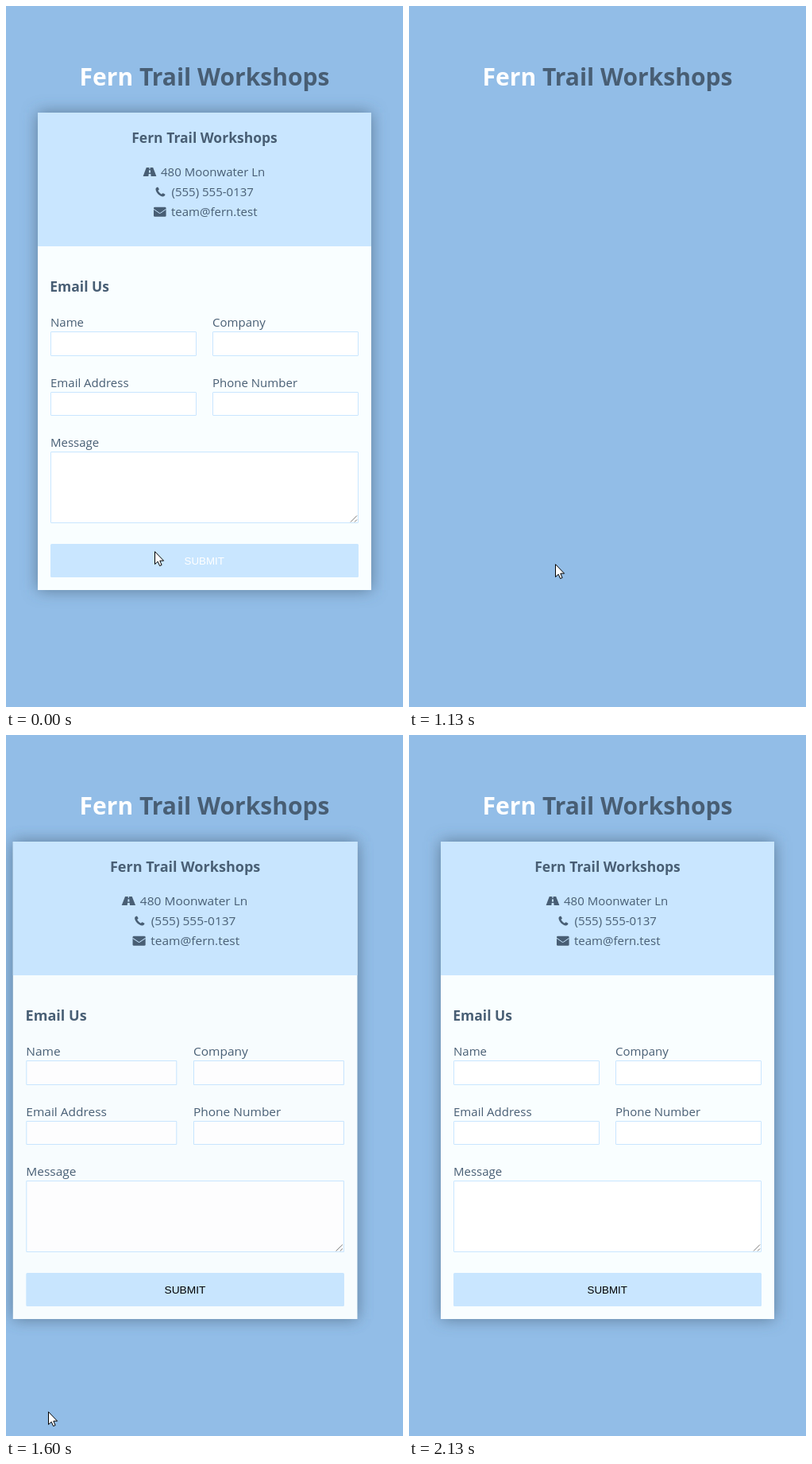
Write an HTML page that moves like this. It is 500 px wide and 881 px high and loops after 2540 ms.

```html
<!DOCTYPE html>
<html lang="en">
<head>
<meta charset="utf-8">
<title>Contact form</title>
<style>
  html, body { margin: 0; width: 100%; height: 100%; overflow: hidden; background: #92bde7; }
  svg { display: block; width: 100%; height: 100%; }
  text { font: 15px "Open Sans", "Noto Sans", sans-serif; fill: #485e74; white-space: pre; }
  .title { font-size: 30px; font-weight: 700; }
  .head { font-size: 17.5px; font-weight: 700; }
  .mid { text-anchor: middle; }
  .label { font: 13.33px "Liberation Sans", Arial, sans-serif; }
  .field { fill: #fff; stroke: #c9e6ff; }
  .icon { fill: #485e74; }
</style>
</head>
<body>
<svg viewBox="0 0 500 881">
  <defs>
    <filter id="blur" filterUnits="userSpaceOnUse" x="0" y="94" width="500" height="680">
      <feGaussianBlur stdDeviation="10"/>
    </filter>
  </defs>
  <rect width="500" height="881" fill="#92bde7"/>
  <text class="title mid" x="250" y="100"><tspan fill="#fff">Fern</tspan> Trail Workshops</text>

  <g id="card">
    <rect x="40" y="134" width="420" height="600" fill="#485e74" fill-opacity=".7" filter="url(#blur)"/>
    <rect x="40" y="134" width="420" height="600" fill="#f9feff"/>
    <rect x="40" y="134" width="420" height="168" fill="#c9e6ff"/>
    <text class="head mid" x="250" y="172">Fern Trail Workshops</text>

    <path class="icon" d="M176.8 203H185.2L189.4 214H172.6Z"/>
    <path fill="#c9e6ff" d="M180.4 203h1.2l.1 1.8h-1.4zM180.2 206.2h1.6l.3 3.2h-2.2zM179.7 211h2.6l.3 3h-3.2z"/>
    <text x="195" y="214">480 Moonwater Ln</text>

    <path class="icon" transform="translate(188.5 227.5)" d="M2.5 0C1 .4 0 1.3 0 3C.3 7 5 11.7 9 12C10.7 12 11.6 11 12 9.5C12 9 9.5 7.7 9 7.7C8.4 7.8 7.9 9 7.4 9C6.3 8.8 3.2 5.7 3 4.6C3 4.1 4.2 3.6 4.3 3C4.3 2.5 3 0 2.5 0Z"/>
    <text x="208.5" y="239">(555) 555-0137</text>

    <rect class="icon" x="186" y="252.8" width="15.6" height="12" rx="1.4"/>
    <path d="M186 255.3L193 260.2q.8.5 1.6 0L201.6 255.3" fill="none" stroke="#c9e6ff"/>
    <text x="208" y="264">team@fern.test</text>

    <text class="head" x="55.3" y="359">Email Us</text>
    <text x="56" y="403">Name</text>
    <text x="260" y="403">Company</text>
    <text x="56" y="479">Email Address</text>
    <text x="260" y="479">Phone Number</text>
    <text x="56" y="554">Message</text>

    <rect class="field" x="56.5" y="409.5" width="183" height="30" rx=".5"/>
    <rect class="field" x="260.5" y="409.5" width="183" height="30" rx=".5"/>
    <rect class="field" x="56.5" y="485.5" width="183" height="29" rx=".5"/>
    <rect class="field" x="260.5" y="485.5" width="183" height="29" rx=".5"/>
    <rect class="field" x="56.5" y="560.5" width="387" height="89" rx=".5"/>
    <path d="M434 648.5L442 640.5M439 648.5L442 645.5" stroke="#666" stroke-width=".9"/>

    <rect id="button" x="56" y="676" width="388" height="42" rx="1.5"/>
    <text id="submit" class="label mid" x="249.8" y="702">SUBMIT</text>
  </g>

  <path id="cursor" d="M.5 .7V16.6L4.2 13.2L6.6 18.6L9.1 17.5L6.8 12.2H11.6Z" fill="#fff" stroke="#000"/>
</svg>
<script>
  const LOOP = 2540;
  const CLICK = 17; // step at which the card re-enters
  const $ = id => document.getElementById(id);
  const [card, button, submit, cursor] = ['card', 'button', 'submit', 'cursor'].map($);
  const lerp = (a, b, p) => a + (b - a) * p;
  const clamp = (v, lo, hi) => Math.min(hi, Math.max(lo, v));

  function bezier(x1, y1, x2, y2) {
    const at = (a, b, s) => 3 * (1 - s) ** 2 * s * a + 3 * (1 - s) * s * s * b + s ** 3;
    return x => {
      if (x <= 0) return 0;
      if (x >= 1) return 1;
      let lo = 0, hi = 1;
      for (let i = 0; i < 30; i++) {
        const mid = (lo + hi) / 2;
        if (at(x1, x2, mid) < x) lo = mid; else hi = mid;
      }
      return at(y1, y2, lo);
    };
  }
  const bounce = bezier(.215, .61, .355, 1);
  const easeOut = bezier(0, 0, .58, 1);

  // Values of the two neighbouring keys, mixed; each key is [time, ...values]
  function track(keys, t, ease = p => p) {
    let i = 1;
    while (i < keys.length - 1 && t > keys[i][0]) i++;
    const a = keys[i - 1], b = keys[i];
    const p = ease(clamp((t - a[0]) / (b[0] - a[0]), 0, 1));
    return a.slice(1).map((v, n) => lerp(v, b[n + 1], p));
  }

  // time in ms, shift, horizontal scale, opacity
  const entry = [
    [0, -3000, 3, 0], [600, 25, 1, 1], [750, -10, .98, 1], [900, 5, .995, 1], [1000, 0, 1, 1]
  ];
  // step, x, y
  const path = [
    [0, 187, 685], [5, 188, 694], [16, 188, 694], [17, 184, 701],
    [22, 80, 809], [24, 53, 850], [26, 27, 891]
  ];
  const light = [201, 230, 255], dark = [146, 189, 231];

  function draw(t) {
    const step = Math.floor((Math.floor(t / 10) * 10 + 5) * .015);
    const hover = step < CLICK;

    const age = clamp(69 * (step - CLICK) - 9, 0, 1000);
    const [shift, scale, alpha] = hover ? [0, 1, 1] : track(entry, age, bounce);
    card.setAttribute('transform', `translate(${250 + shift} 0) scale(${scale} 1) translate(-250 0)`);
    card.setAttribute('opacity', alpha);

    const p = hover ? easeOut(step / 15) : 0;
    button.setAttribute('fill', `rgb(${light.map((v, i) => Math.round(lerp(v, dark[i], p)))})`);
    submit.style.fill = hover ? '#fff' : '#000';

    const [x, y] = track(path, step).map(Math.round);
    cursor.setAttribute('transform', `translate(${x} ${y})`);
  }

  const start = performance.now();
  function tick() {
    draw((performance.now() - start) % LOOP);
    requestAnimationFrame(tick);
  }
  tick();
</script>
</body>
</html>
```
